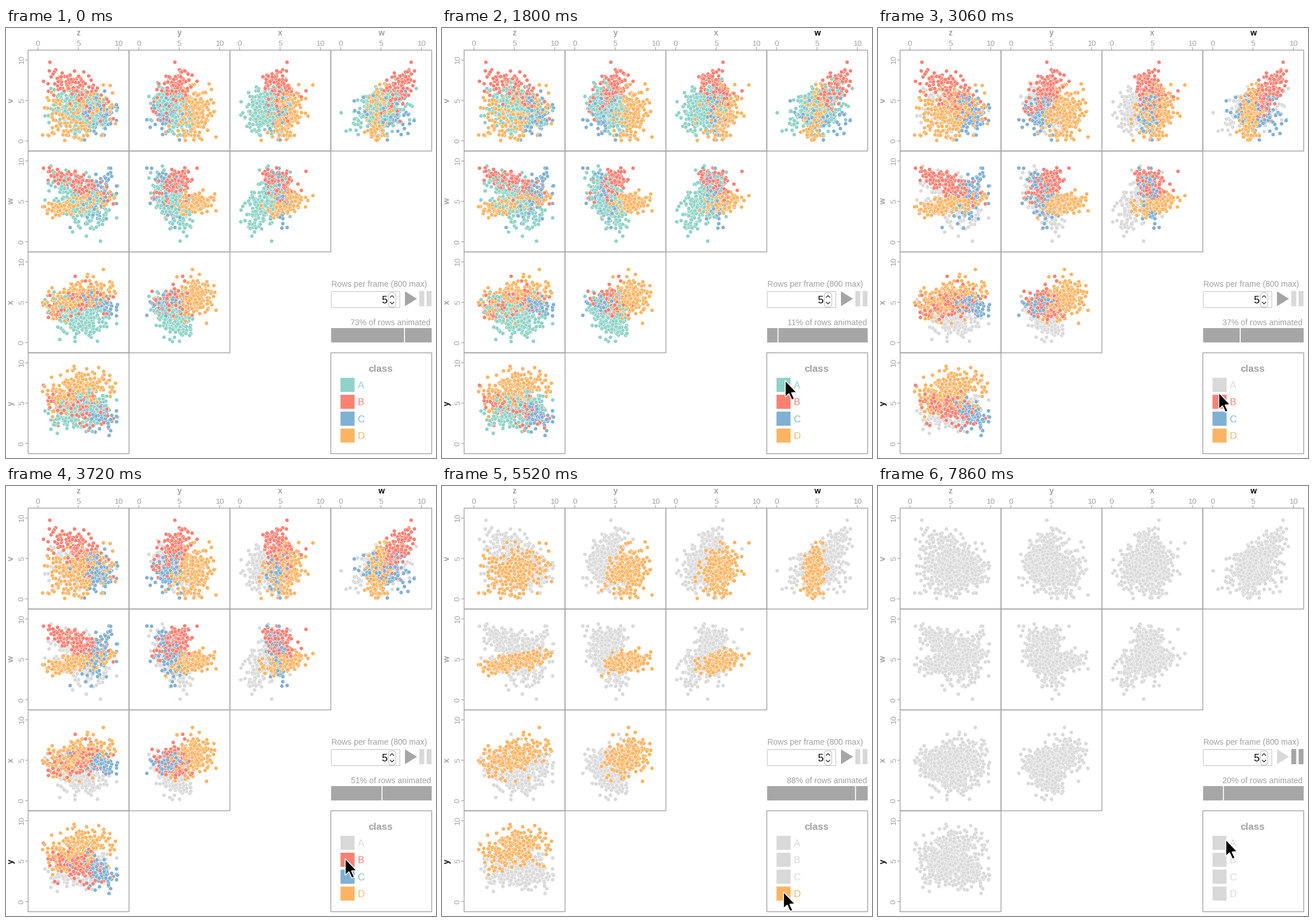
Recreate the animation shown at these times as a matplotlib script. Size 748x748 px, loop 8000 ms.

```python
from functools import lru_cache

import numpy as np
import matplotlib.pyplot as plt
from matplotlib.animation import FuncAnimation
from matplotlib.colors import to_rgb
from matplotlib.patches import FancyBboxPatch, Polygon, Rectangle

SIZE, DPI = 748, 88
PX = 72 / DPI
FRAMES, INTERVAL, TICK = 200, 40, 60

INK, LIGHT, DARK = "#a2a2a2", "#d9d9d9", "#a6a6a6"
COLORS = {"A": "#8dd3c7", "B": "#fb8072", "C": "#80b1d3", "D": "#fdb462"}
COLS, ROWS, VARS = "zyxw", "vwxy", "zwyxv"
EDGE, CELL, PAD, UNIT = 38.5, 175.5, 17, 14.05

# Each class is one stretched cloud in z, w, y, x, v: size, centre, long axis, spread.
CLOUDS = [
    (270, (5.0, 5.0, 4.2, 3.3, 3.9), (.9, -1.35, .8, -.7, -.5), (1.3, .9, .8, 1.0, 1.2)),
    (160, (4.6, 7.1, 4.5, 4.9, 6.1), (1.8, -.9, -.6, .4, -1.2), (1.0, .6, .9, 1.0, .9)),
    (110, (7.3, 5.4, 3.9, 4.8, 3.4), (.8, 1.2, -.6, -.4, -.2), (.7, .9, .8, .5, 1.1)),
    (260, (4.9, 4.7, 6.7, 5.4, 3.4), (1.6, .5, .4, .5, .4), (1.2, .35, 1.2, 1.0, 1.5)),
]

# Cursor stops: time of leaving for the stop, then its place; x > SIZE is out of view.
FIRST_CLICK, CLICK_GAP = 2820, 1020
CLICKS = [FIRST_CLICK + CLICK_GAP * k for k in range(4)]
STOPS = [(480, 605, 615), (1140, 597, 613), (CLICKS[0], 590, 648), (CLICKS[1], 593, 682),
         (CLICKS[2], 594, 706), (CLICKS[3], 754, 560), (6600, 727, 468), (7320, 605, 615)]
OFFSTAGE, MOVE_MS, PAUSE_AT = (754, 640), 420, 7080
START, STEP, STOP = 73.125, 1.25, 220


def col_x(c, v):
    return EDGE + CELL * c + PAD + UNIT * v


def row_y(r, v):
    return EDGE + CELL * (r + 1) - PAD - .7 - UNIT * v


def make_rows():
    rng = np.random.default_rng(12)
    data, kind = [], []
    for k, (n, centre, axis, spread) in enumerate(CLOUDS):
        pts = (centre + rng.normal(size=(3 * n, 1)) * axis
               + rng.normal(size=(3 * n, 5)) * spread)
        data.append(pts[((pts >= 0) & (pts <= 10)).all(axis=1)][:n])
        kind += [k] * n
    order = rng.permutation(len(kind))
    return np.vstack(data)[order], np.array(kind)[order]


def make_stamps(data, kind):
    """Pixel indices and blend weights of every dot, one dot per panel and row."""
    cells = [(r, c) for r in range(4) for c in range(4 - r)]
    cx = np.stack([col_x(c, data[:, VARS.index(COLS[c])]) for r, c in cells], 1)
    cy = np.stack([row_y(r, data[:, VARS.index(ROWS[r])]) for r, c in cells], 1)
    cx, cy = cx[..., None, None], cy[..., None, None]
    off = np.arange(-4, 5)
    ix = np.floor(cx).astype(int) + off
    iy = np.floor(cy).astype(int) + off[:, None]
    dist = np.hypot(ix + .5 - cx, iy + .5 - cy)
    flat = (len(data), -1)
    rim, core = (np.clip(r + .5 - dist, 0, 1).reshape(flat)[..., None].astype(np.float32)
                 for r in (3.6, 3.1))
    white = rim * (1 - core)
    palette = np.array([to_rgb(c) for c in COLORS.values()], np.float32)
    grey = np.array(to_rgb(LIGHT), np.float32)
    return ((iy * SIZE + ix).reshape(flat), (1 - rim) * (1 - core),
            white + core * palette[kind][:, None], white + core * grey)


DATA, KIND = make_rows()
INDEX, KEEP, VIVID, MUTED = make_stamps(DATA, KIND)


@lru_cache(maxsize=2)
def cloud(drawn, hidden):
    """All dots, with the most recently animated rows on top and muted ones below."""
    img = np.ones((SIZE * SIZE, 3), np.float32)
    order = (np.arange(len(KIND)) + drawn) % len(KIND)
    off = KIND[order] < hidden
    for rows, paint in ((order[off], MUTED), (order[~off], VIVID)):
        for i in rows:
            img[INDEX[i]] = img[INDEX[i]] * KEEP[i] + paint[i]
    return (img * 255 + .5).astype(np.uint8).reshape(SIZE, SIZE, 3)


fig = plt.figure(figsize=(SIZE / DPI, SIZE / DPI), dpi=DPI, facecolor="white")
ax = fig.add_axes([0, 0, 1, 1])
ax.axis("off")


def text(x, y, s, size, color=INK, **kw):
    return ax.text(x, y, s, fontsize=size * PX, color=color, family="Liberation Sans",
                   rotation_mode="anchor", va="baseline", zorder=4, **kw)


def box(x, y, w, h, fill="none", edge="none", lw=1.0):
    return ax.add_patch(Rectangle((x, y), w, h, fc=fill, ec=edge, lw=lw * PX,
                                  snap=False, zorder=3))


def line(xs, ys, color=INK, lw=1.2, z=3):
    return ax.plot(xs, ys, color=color, lw=lw * PX, snap=False, zorder=z)[0]


def shape(points, fill, edge="none", lw=0.0, z=3):
    return ax.add_patch(Polygon(points, closed=True, fc=fill, ec=edge, lw=lw * PX, zorder=z))


picture = ax.imshow(np.full((SIZE, SIZE, 3), 255, np.uint8), extent=(0, SIZE, SIZE, 0),
                    interpolation="nearest", aspect="auto", zorder=0)
ax.set_xlim(0, SIZE)
ax.set_ylim(SIZE, 0)

# Panels and axes
col_labels, row_labels = [], []
for k in range(4):
    start = EDGE + CELL * k
    for c in range(4 - k):
        box(EDGE + CELL * c, start, CELL, CELL, edge=INK, lw=1.4)
    mid = start + CELL / 2
    col_labels.append(text(mid, 13, COLS[k], 14, ha="center", weight="bold"))
    row_labels.append(text(13, mid, ROWS[k], 14, ha="center", weight="bold", rotation=90))
    for v in (0, 5, 10):
        tx, ty = col_x(k, v), row_y(k, v)
        line([tx, tx], [34, 38])
        line([34, 38], [ty, ty])
        text(tx, 31, str(v), 13.5, ha="center")
        text(31, ty, str(v), 13.5, ha="center", rotation=90)

# Controls
text(566, 449.5, "Rows per frame (800 max)", 14)
box(566, 458.5, 119, 28, "white", "#c0c0c0")
text(663.5, 479, "5", 18, "black", ha="right")
ax.add_patch(FancyBboxPatch((670.5, 466), 2, 14, boxstyle="round,pad=5.5,rounding_size=5.5",
                            fc="white", ec="#b8b8b8", lw=PX, zorder=3))
for y, d in ((468.5, -1), (477, 1)):
    line([668.5, 671.5, 674.5], [y, y + 3 * d, y], "#404040", 1.5, 4)
play = shape([(694, 458), (694, 484), (715, 471)], DARK)
pause = [box(x, 457.5, 8.5, 26.5, LIGHT) for x in (719, 731.7)]
percent = text(739, 517, "", 14, ha="right")
box(565.5, 522, 175, 25, DARK)
mark = line([0, 0], [522, 547], "white", 1.7, 4)

# Legend
box(EDGE + 3 * CELL, EDGE + 3 * CELL, CELL, CELL, edge=INK, lw=1.4)
text(652, 597.5, "class", 17, ha="center", weight="bold")
legend = []
for k, name in enumerate(COLORS):
    y = 620.8 + 29.4 * k
    legend.append((box(582.3, y - 11.8, 23.6, 23.6), text(611.5, y + 6, name, 17)))

ARROW = np.array([(0, 0), (0, 29), (6.5, 23), (11.5, 34), (16, 32), (11, 21.5), (20, 21)])
cursor = shape(ARROW, "black", "white", 1.6, 6)


def tip(t):
    pos = np.array(OFFSTAGE, float)
    for leave, *place in STOPS:
        u = np.clip((t - leave) / MOVE_MS, 0, 1)
        pos += (np.array(place) - pos) * u * u * (3 - 2 * u)
    return pos


def highlight(labels, at):
    cell = (at - EDGE) // CELL
    for k, label in enumerate(labels):
        label.set_color("black" if k == cell else INK)


def update(frame):
    t = (frame * INTERVAL + TICK // 3) // TICK * TICK
    hidden = sum(t >= c for c in CLICKS)
    progress = min(START + STEP * t / TICK, STOP)
    picture.set_data(cloud(int(progress * len(KIND) / 100) % len(KIND), hidden))

    share = progress % 100
    percent.set_text(f"{round(share)}% of rows animated")
    mark.set_xdata([566 + 1.74 * share] * 2)

    for k, (parts, color) in enumerate(zip(legend, COLORS.values())):
        for part in parts:
            part.set_color(LIGHT if k < hidden else color)

    paused = t >= PAUSE_AT
    play.set_facecolor(LIGHT if paused else DARK)
    for bar in pause:
        bar.set_facecolor(DARK if paused else LIGHT)

    x, y = tip(t)
    cursor.set_xy(ARROW + (x, y))
    inside = x < EDGE + 4 * CELL
    highlight(col_labels, x if inside else -SIZE)
    highlight(row_labels, y if inside else -SIZE)
    return [picture]


anim = FuncAnimation(fig, update, frames=FRAMES, interval=INTERVAL, repeat=True,
                     repeat_delay=0, blit=False)
plt.show()
```
